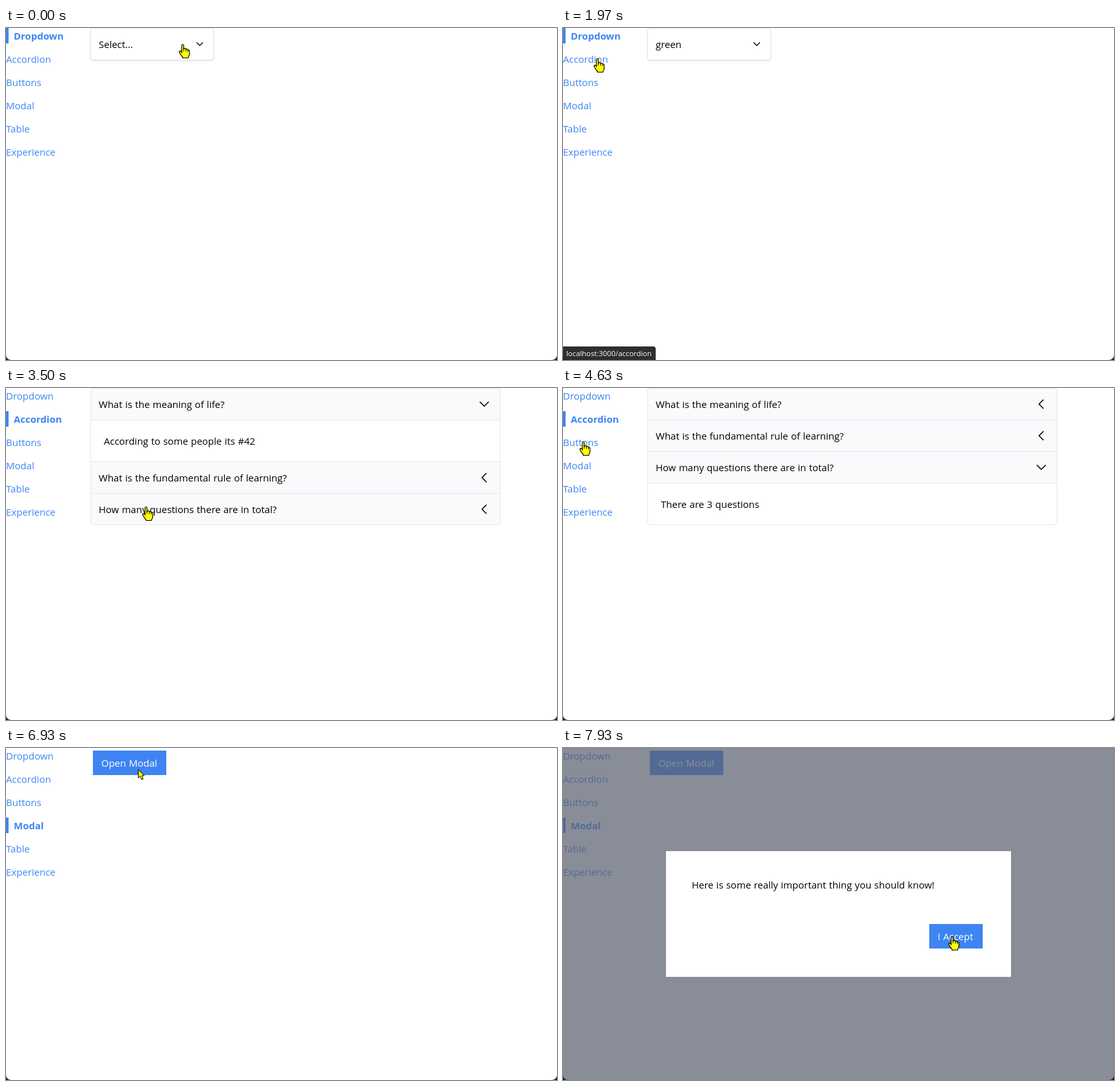
Write an HTML page that moves like this. It is 856x515 px and loops after 8000 ms.

```html
<!DOCTYPE html>
<html lang="en">
<head>
<meta charset="utf-8">
<title>Component showcase</title>
<style>
  html, body { margin: 0; width: 100%; height: 100%; overflow: hidden; background: #fff; }
  svg { display: block; width: 856px; height: 515px; }
  text { font: 15px "Open Sans", "Noto Sans", sans-serif; word-spacing: .5px; white-space: pre; }
  .active { font-weight: 700; }
  #status text { font-size: 11.36px; }
  .card { fill: #fff; stroke: #e5e7eb; filter: drop-shadow(0 1px 1px rgba(0, 0, 0, .13)); }
  .line { fill: none; stroke-linecap: round; stroke-linejoin: round; }
</style>
</head>
<body>
<svg viewBox="0 0 856 515" xmlns="http://www.w3.org/2000/svg">
  <rect width="856" height="515" fill="#fff"/>
  <g id="scene"></g>
  <path d="M0 507A8 8 0 0 0 8 515H0ZM856 507A8 8 0 0 1 848 515H856Z" fill="#222"/>
  <g id="status">
    <path fill="#202124"/>
    <text x="5" y="509" fill="#fff"></text>
  </g>
  <g id="cursor"></g>
</svg>
<script>
const LOOP = 8000;
const BLUE = '#3e84f3', RED = '#e0384a', YELLOW = '#f9c926', GREEN = '#42bd63', INK = '#111';
const LINKS = ['Dropdown', 'Accordion', 'Buttons', 'Modal', 'Table', 'Experience'];
const OPTIONS = ['red', 'green', 'blue'];
const QUESTIONS = [
  ['What is the meaning of life?', 'According to some people its #42'],
  ['What is the fundamental rule of learning?', ''],
  ['How many questions there are in total?', 'There are 3 questions']
];

const $ = id => document.getElementById(id);
const text = (x, y, s, fill = '#000', cls = '') =>
  `<text x="${x}" y="${y}" fill="${fill}" class="${cls}">${s}</text>`;
const rect = (x, y, w, h, fill, extra = '') =>
  `<rect x="${x}" y="${y}" width="${w}" height="${h}" fill="${fill}" ${extra}/>`;
const line = (d, color = '#000', width = 1) =>
  `<path class="line" d="${d}" stroke="${color}" stroke-width="${width}"/>`;
const card = (y, h) =>
  `<rect class="card" x="131.5" y="${y + .5}" width="191" height="${h - 1}" rx="3.5"/>`;

function nav(active) {
  return LINKS.map((name, i) => i === active
    ? rect(0, 36 * i, 4, 24, BLUE) + text(12, 36 * i + 18, name, BLUE, 'active')
    : text(0, 36 * i + 18, name, BLUE)).join('');
}

function dropdown(label, open) {
  let out = nav(0) + card(0, 50) + text(144, 31, label) + line('M296.5 22.7L301 27.2L305.5 22.7', '#000', 1.3);
  if (open) {
    out += card(50, 122) + rect(144, 95, 166, 32, '#e0f2fe', 'id="hover" rx="3"');
    out += OPTIONS.map((s, i) => text(148, 85 + 32 * i, s)).join('');
  }
  return out;
}

function accordion(open) {
  let y = 0, out = nav(1);
  QUESTIONS.forEach(([question, answer], i) => {
    out += rect(132, y + 1, 635, 48, '#f9fafb') + text(144, y + 31, question);
    out += line(i === open
      ? `M736.5 ${y + 21.8}L743 ${y + 28.3}L749.5 ${y + 21.8}`
      : `M746 ${y + 18.5}L739.5 ${y + 25}L746 ${y + 31.5}`, '#000', 1.6);
    y += 49;
    if (i === open) {
      out += rect(132, y, 635, 1, '#e5e7eb') + text(152, y + 39, answer);
      y += 65;
    }
    if (i < 2) out += rect(132, y, 635, 1, '#e5e7eb');
  });
  return out + rect(131.5, .5, 636, y - 1 + .5, 'none', 'rx="3.5" stroke="#e5e7eb"');
}

const solid = (x, y, w, s, fill, tx) => rect(x, y, w, 38, fill) + text(tx, y + 25, s, '#fff');
const outline = (y, w, s, color, tx, round) =>
  rect(135.5, y + .5, w - 1, 37, 'none', `stroke="${color}" rx="${round}"`) + text(tx, y + 25, s, color);

function buttons() {
  return nav(2)
    + solid(135, 4, 106, 'Click me', BLUE, 169)
    + line('M155.1 17Q156 15.6 156.9 17L163 28Q163.6 29.5 162.2 29.5H149.8Q148.4 29.5 149 28ZM156 20.8V24.8M156 27V27.1', '#fff')
    + outline(46, 99, 'Buy me', INK, 169, 18.5)
    + line('M149.5 69.5Q151.6 67.8 151.6 62.8Q152 59.2 156 59Q160 59.2 160.4 62.8Q160.4 67.8 162.5 69.5ZM156 58V59M154 71Q156 73.4 158 71', INK)
    + outline(88, 108, 'See Deal', RED, 169, 0)
    + line('M150 102.5A6 2.3 0 0 1 162 102.5A6 2.3 0 0 1 150 102.5V111.5A6 2.3 0 0 0 162 111.5V102.5M150 105.5A6 2.3 0 0 0 162 105.5M150 108.5A6 2.3 0 0 0 162 108.5', RED)
    + solid(135, 130, 87, 'Hide ads', YELLOW, 148)
    + outline(172, 103, 'Something', GREEN, 148, 18.5);
}

function modal(open) {
  let out = nav(3) + solid(135, 4, 114, 'Open Modal', BLUE, 148);
  if (open) {
    out += rect(0, 0, 856, 515, 'rgb(92,97,113)', 'opacity=".72"') + rect(160, 160, 536, 195, '#fff')
      + text(200, 218, 'Here is some really important thing you should know!')
      + solid(569, 273, 83, 'I Accept', BLUE, 582);
  }
  return out;
}

// [start time, markup]
const SCENES = [
  [0, dropdown('Select...', false)],
  [600, dropdown('Select...', true)],
  [1230, dropdown('green', false)],
  [2100, accordion(-1)],
  [2820, accordion(0)],
  [3670, accordion(2)],
  [5030, buttons()],
  [6070, modal(false)],
  [6970, modal(true)]
];

// [fade in, fade out, path]; a new path replaces the old one at once
const STATUS = [
  [1830, 2630, 'accordion', 144],
  [4830, 5450, 'buttons', 134],
  [5450, 6430, 'modal', 126]
];

const CURSORS = {
  hand: '<path d="M-2 2Q-2 .5-.5 .5T1 2V7Q3.8 5.8 4.6 7.8Q7 7 7.6 8.8Q10 8.4 10 11V15Q10 18 8 20.5V21.5H-.5V20.5Q-3 17.5-5 14Q-6.3 11.5-5 10.8Q-3.6 10.2-2 12.6Z" fill="#ff0" stroke="#000" stroke-width="1.2"/>'
    + line('M1 7V10.5M4.6 8V11M7.6 9V11.5'),
  arrow: '<path d="M.5 .5V13.5L3.5 10.7L5.8 16L8.2 15L5.9 9.9H10Z" fill="#ff0" stroke="#000"/>',
  beam: line('M-3-8H-1L0-7L1-8H3M0-7V7M-3 8H-1L0 7L1 8H3')
};

// [time, x, y, cursor from here on]
const PATH = [
  [0, 275, 25, 'hand'], [770, 275, 25, 'hand'], [930, 248, 62, 'hand'], [1130, 207, 103, 'hand'],
  [1230, 196, 108, 'arrow'], [1570, 98, 66, 'arrow'], [1680, 74, 55, 'hand'], [1950, 54, 47, 'hand'],
  [2270, 54, 47, 'hand'], [2390, 105, 43, 'arrow'], [2450, 150, 40, 'hand'], [2670, 281, 32, 'hand'],
  [2820, 283, 31, 'hand'], [2920, 274, 52, 'arrow'], [2990, 264, 72, 'beam'], [3070, 254, 87, 'beam'],
  [3180, 242, 114, 'hand'], [3500, 218, 184, 'hand'], [3700, 218, 184, 'beam'], [4000, 218, 184, 'beam'],
  [4130, 232, 147, 'hand'], [4260, 208, 122, 'hand'], [4400, 128, 100, 'arrow'], [4520, 66, 87, 'hand'],
  [4700, 24, 82, 'hand'], [5200, 24, 82, 'hand'], [5310, 26, 96, 'arrow'], [5390, 28, 107, 'hand'],
  [5600, 31, 120, 'hand'], [6070, 31, 120, 'hand'], [6250, 60, 105, 'arrow'], [6600, 184, 41, 'hand'],
  [6770, 205, 33, 'hand'], [6930, 205, 33, 'arrow'], [7200, 205, 33, 'arrow'], [7440, 395, 176, 'arrow'],
  [7660, 582, 288, 'hand'], [7780, 604, 301, 'hand'], [7930, 605, 292, 'hand'], [LOOP, 605, 292, 'hand']
];

const clamp = v => Math.max(0, Math.min(1, v));
const rests = (a, b) => !a || !b || (a[1] === b[1] && a[2] === b[2]);

function speed(k, axis) {
  const a = PATH[k - 1], p = PATH[k], b = PATH[k + 1];
  return rests(a, p) || rests(p, b) ? 0 : (b[axis] - a[axis]) / (b[0] - a[0]);
}

// Smooth curve through the path points
function along(k, t, axis) {
  const p = PATH[k], q = PATH[k + 1], span = q[0] - p[0], u = (t - p[0]) / span;
  const s = u * u * (3 - 2 * u);
  return p[axis] * (1 - s) + q[axis] * s
    + span * u * (1 - u) * ((1 - u) * speed(k, axis) - u * speed(k + 1, axis));
}

let shownScene, shownCursor;

function draw(t) {
  const scene = SCENES.findLast(s => s[0] <= t);
  if (scene !== shownScene) $('scene').innerHTML = (shownScene = scene)[1];

  const k = PATH.findLastIndex((p, i) => p[0] <= t && i < PATH.length - 1);
  const x = along(k, t, 1), y = along(k, t, 2), kind = PATH[k][3];
  if (kind !== shownCursor) $('cursor').innerHTML = CURSORS[shownCursor = kind];
  $('cursor').setAttribute('transform', `translate(${Math.round(x)} ${Math.round(y)})`);

  const hover = $('hover');
  if (hover) {
    const row = Math.floor((y - 63) / 32);
    hover.setAttribute('y', 63 + 32 * row);
    hover.setAttribute('visibility', row >= 0 && row < 3 ? 'visible' : 'hidden');
  }

  const item = STATUS.findLast(s => s[0] <= t);
  const bar = $('status');
  let alpha = 0;
  if (item) {
    const [start, end, path, width] = item;
    const fadeIn = path === 'modal' ? 1 : clamp((t - start) / 150);
    alpha = fadeIn * (1 - clamp((t - end) / 180));
    bar.children[0].setAttribute('d', `M0 494H${width - 4}Q${width} 494 ${width} 498V515H0Z`);
    bar.children[1].textContent = 'localhost:3000/' + path;
  }
  bar.setAttribute('opacity', alpha);
}

function tick() {
  draw(performance.now() % LOOP);
  requestAnimationFrame(tick);
}
tick();
</script>
</body>
</html>
```
